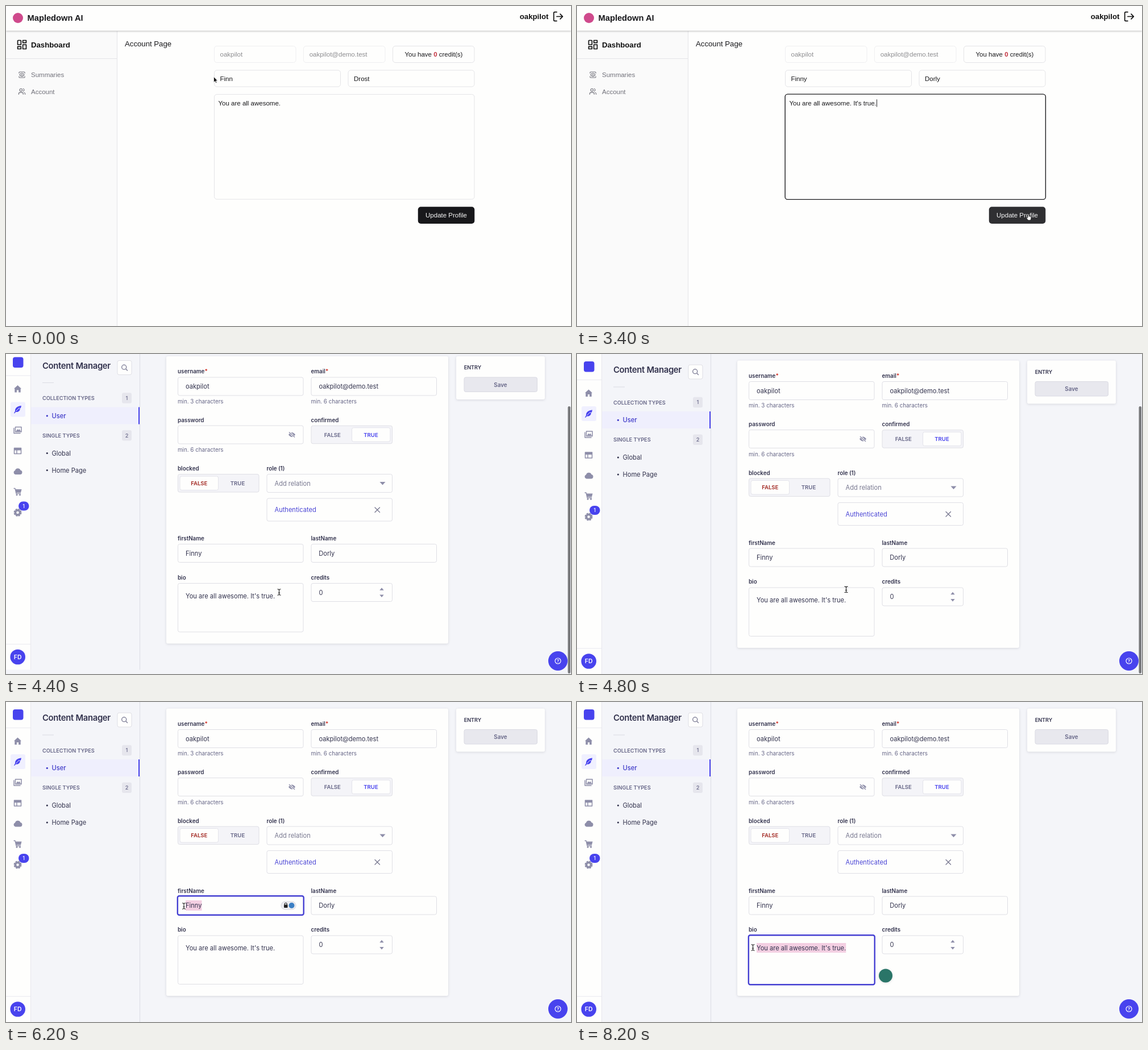
Write an HTML page that moves like this. It is 994 px wide and 563 px high and loops after 8400 ms.

```html
<!DOCTYPE html>
<html lang="en">
<head>
<meta charset="utf-8">
<title>Profile update</title>
<style>
html, body { margin: 0; width: 100%; height: 100%; overflow: hidden; background: #fefefd; }
svg { display: block; width: 994px; height: 563px; }
text { white-space: pre; }
.user { font-family: "Liberation Sans", Arial, sans-serif; }
.admin { font-family: Inter, "Open Sans", sans-serif; }
.card { filter: drop-shadow(0 1px 2px #21213425); }
.line { fill: none; stroke-linecap: round; stroke-linejoin: round; }
</style>
</head>
<body>
<svg id="stage" viewBox="0 0 994 563"></svg>
<script>
const LOOP = 8400, STEP = 200;
const BLUE = '#4843ee', INK = '#32324d', GREY = '#666687', ICON = '#8e8ea9', EDGE = '#dfdfe5', PAPER = '#fefefd';
const NAME = 'oakpilot', MAIL = 'oakpilot@demo.test';

// Markup helpers
const text = (x, y, s, size, fill, weight = 400, more = '') =>
  `<text x="${x}" y="${y}" font-size="${size}" fill="${fill}" font-weight="${weight}" ${more}>${s}</text>`;
const mid = (x, y, s, size, fill, weight) => text(x, y, s, size, fill, weight, 'text-anchor="middle"');
const box = (x, y, w, h, fill, stroke = 'none', r = 0, more = '') =>
  `<rect x="${x}" y="${y}" width="${w}" height="${h}" rx="${r}" fill="${fill}" stroke="${stroke}" ${more}/>`;
const dot = (x, y, r, fill, more = '') => `<circle cx="${x}" cy="${y}" r="${r}" fill="${fill}" ${more}/>`;
const path = (d, more = '') => `<path d="${d}" ${more}/>`;
const at = (x, y, body, more = '', scale = 1) =>
  `<g transform="translate(${x} ${y}) scale(${scale})" ${more}>${body}</g>`;
// Outline icon on a 24 unit grid, centred at x, y
const outline = (x, y, scale, colour, body) =>
  at(x, y, `<g transform="translate(-12 -12)">${body}</g>`, `class="line" stroke="${colour}" stroke-width="2"`, scale);

// Editable fields: box, text position, text size, height of the marking above and below the baseline
const fields = {
  first: { r: [366.5, 113, 222, 29], x: 376.5, y: 131.7, up: 10.7, down: 2.5 },
  last: { r: [602, 113, 222, 29], x: 612, y: 131.7, up: 10.7, down: 2.5 },
  area: { r: [366.5, 155.5, 457.5, 184.5], x: 373.5, y: 175, up: 10.7, down: 2.5 },
  adminFirst: { r: [302.5, 342, 220.5, 32], x: 316, y: 362.2, up: 13.2, down: 4.8 },
  adminLast: { r: [537, 342, 220.5, 32], x: 550.3, y: 362.2, up: 13.2, down: 4.8 },
  adminArea: { r: [302.5, 411, 220.5, 85.5], x: 316, y: 437, up: 13, down: 4 }
};
const isAdmin = id => id.startsWith('admin');
function fieldMarkup(id) {
  const f = fields[id], a = isAdmin(id);
  return box(...f.r, PAPER, a ? EDGE : '#e4e4e7', a ? 3 : 4.5, `id="${id}Box"`) +
    box(f.x, f.y - f.up, 0, f.up + f.down, '#f3cfe2', 'none', 0, `id="${id}Mark"`) +
    text(f.x, f.y, '', a ? 11.1 : 11.5, a ? INK : '#18181b', 400, `id="${id}Text"`) +
    box(f.x, f.y - f.up, 0.9, f.up + f.down, '#18181b', 'none', 0, `id="${id}Caret"`);
}

function userScene() {
  const mute = '#71717a', pale = '#efeff1';
  return box(0, 0, 994, 563, PAPER) +
    box(0, 44, 195, 519, '#fafafa') + box(195, 44, 1, 519, '#e4e4e8') + box(0, 92, 195, 1, '#e4e4e8') +
    box(0, 0, 994, 43.5, PAPER, 'none', 0, 'style="filter:drop-shadow(0 1px 1.5px #0004)"') +
    dot(21, 21, 9, '#cf4a8c') +
    text(37.5, 26, 'Mapledown AI', 14.7, '#18181b', 700) +
    text(903.8, 23.2, NAME, 13.2, '#111', 700) +
    outline(971.5, 18.5, 0.87, '#111', path('M9 21H5a2 2 0 0 1-2-2V5a2 2 0 0 1 2-2h4M16 17l5-5-5-5M21 12H9')) +
    outline(28, 68, 0.83, '#111', path('M4 3h5a1 1 0 0 1 1 1v8H3V4a1 1 0 0 1 1-1zM14 3h7v5h-7zM14 12h7v9h-7zM3 16h7v5H3z')) +
    text(44, 72.8, 'Dashboard', 13.2, '#111', 700) +
    outline(28, 121, 0.56, mute, path('M5 12s2.5-5 7-5 7 5 7 5-2.5 5-7 5-7-5-7-5zM21 17v2a2 2 0 0 1-2 2H5a2 2 0 0 1-2-2v-2M21 7V5a2 2 0 0 0-2-2H5a2 2 0 0 0-2 2v2') + dot(12, 12, 1, mute)) +
    text(44, 125, 'Summaries', 11.5, mute) +
    outline(28, 150.5, 0.56, mute, path('M16 21v-2a4 4 0 0 0-4-4H6a4 4 0 0 0-4 4v2M22 21v-2a4 4 0 0 0-3-3.9M16 3.1a4 4 0 0 1 0 7.8') + dot(9, 7, 4, 'none')) +
    text(44, 154.8, 'Account', 11.5, mute) +
    text(209, 71.3, 'Account Page', 13.2, '#18181b') +
    box(366.5, 70.5, 143.5, 29, PAPER, pale, 4.5) + text(376.5, 89, NAME, 11.5, '#8d8d90') +
    box(523.5, 70.5, 143.5, 29, PAPER, pale, 4.5) + text(533.7, 89, MAIL, 11.5, '#8d8d90') +
    box(680.5, 70.5, 143.5, 29, PAPER, '#e4e4e7', 4.5) +
    mid(752.4, 89, 'You have <tspan fill="#c3313f" font-weight="700">0</tspan> credit(s)', 11.5, '#18181b') +
    ['first', 'last', 'area'].map(fieldMarkup).join('') +
    box(724.8, 353.3, 99.5, 29.7, '#18181b', 'none', 5, 'id="update"') +
    mid(774.5, 372.3, 'Update Profile', 11.5, '#fafafa');
}

function adminNav() {
  const icons =
    at(20.5, 69, path('M0-6.5L6.5-.5H5.2V6H1.6V2H-1.6V6H-5.2V-.5H-6.5z')) +
    at(20.5, 105, path('M6.5-6.5C1-6.5-5-3-4.5 3L-6.5 6.5l1 .5L-3.5 4.5C3 5 4 1 4.5-1H2L5.5-2.5z', `fill="${BLUE}"`) +
      path('M-3 3L3-3', 'stroke="#f0f0ff"')) +
    at(20.5, 141.5, path('M-4-5.5H6.5V3H-4zM-6.5-3.5V5.5H4.5', `class="line" stroke="${ICON}" stroke-width="1.5"`) + path('M-3 2L0-2 1.5 0 3-2 5.5 2z')) +
    at(20.5, 178, path('M-6-5H6V5H-6zM-6-1.8H6M-1.5-2V5', `class="line" stroke="${ICON}" stroke-width="1.5"`) + box(-6, -5, 12, 3)) +
    at(20.5, 214, path('M-4 5.5A3.7 3.7 0 0 1-4.5-1.6 5 5 0 0 1 5-2 3.8 3.8 0 0 1 4 5.5z')) +
    at(20.5, 250, path('M-6.5-6H-4.5L-2.5 3H5', `class="line" stroke="${ICON}" stroke-width="1.4"`) +
      path('M-4-4.5H7L5.5 1.5H-2.8z') + dot(-1.5, 5.3, 1.5, ICON) + dot(4, 5.3, 1.5, ICON)) +
    at(20.5, 286.5, dot(0, 0, 4, 'none', `stroke="${ICON}" stroke-width="3.5"`) +
      dot(0, 0, 6, 'none', `stroke="${ICON}" stroke-width="2" stroke-dasharray="3.2 1.51"`));
  const badge = (y, n) => box(204, y, 17, 18.5, '#e6e6ed', 'none', 3) + mid(212.5, y + 12.7, n, 9.2, GREY, 500);
  const item = (y, s, fill, weight) => dot(72.3, y - 4, 1.6, fill) + text(80.5, y, s, 11.1, fill, weight);
  return box(0, -20, 43.5, 583, PAPER) + box(43, -20, 1, 583, '#e8e8ee') + box(235, -20, 1, 583, '#dcdce4') +
    box(12, 13, 18.5, 18.5, BLUE, 'none', 4) + box(0, 45, 43, 1, '#eaeaef') +
    box(8, 92, 26, 26, '#f0f0ff', 'none', 3) + `<g fill="${ICON}">${icons}</g>` +
    box(22, 267, 18.5, 16, BLUE, 'none', 8) + mid(31.2, 278.3, '1', 9, '#fff', 500) +
    box(0, 517.5, 43, 1, '#eaeaef') + dot(20.7, 540.5, 13.3, BLUE) + mid(20.7, 544.3, 'FD', 10.5, '#fff', 600) +
    text(64, 33, 'Content Manager', 14.8, INK, 600, 'letter-spacing="-.3"') +
    box(196, 19, 25, 25, PAPER, EDGE, 3) +
    at(208.5, 31.5, path('M2.8 2.8L5 5') + dot(-.8, -.8, 4, 'none'), 'class="line" stroke="#777791" stroke-width="1.3"') +
    box(64, 57.5, 20, 1, '#dcdce4') +
    text(64, 88.6, 'COLLECTION TYPES', 9.2, GREY, 600) + badge(75.7, '1') +
    box(44, 101, 191, 30, '#efeffd') + box(233, 101, 2, 30, BLUE) + item(120.3, 'User', '#3c37c8', 500) +
    text(64, 154.2, 'SINGLE TYPES', 9.2, GREY, 600) + badge(141.5, '2') +
    item(186, 'Global', INK) + item(216, 'Home Page', INK);
}

function adminForm() {
  const label = (x, y, s, star) => text(x, y, s + (star ? '<tspan fill="#d02b20">*</tspan>' : ''), 9.8, INK, 600);
  const hint = (x, y, n) => text(x, y, `min. ${n} characters`, 9.8, GREY);
  const input = (x, y, w, h, s = '', fill = INK) => box(x, y, w, h, PAPER, EDGE, 3) + text(x + 13.5, y + 20.2, s, 11.1, fill);
  const toggle = (x, y, on, colour) => box(x, y, 142.5, 31.5, '#f4f4f8', EDGE, 3) +
    box(x + (on ? 71.5 : 3.5), y + 3.5, 67.5, 24.5, PAPER, '#e3e3ea', 3) +
    mid(x + 37.3, y + 19.3, 'FALSE', 9.6, on ? GREY : colour, 600) +
    mid(x + 105, y + 19.3, 'TRUE', 9.6, on ? colour : GREY, 600);
  return box(282, 11.5, 496, 505.5, PAPER, 'none', 3, 'class="card"') +
    box(792, 11.5, 156, 76, PAPER, 'none', 3, 'class="card"') +
    text(805.7, 34.7, 'ENTRY', 9.1, INK, 600) +
    box(806, 48.5, 128.5, 25.5, '#e8e8ee', '#d9d9e2', 3) + mid(870, 65, 'Save', 9.9, GREY, 600) +
    label(302, 41.5, 'username', 1) + input(302.5, 48.5, 220.5, 32, NAME) + hint(302, 94, 3) +
    label(536.5, 41.5, 'email', 1) + input(537, 48.5, 220.5, 32, MAIL) + hint(536.5, 94, 6) +
    label(302, 127, 'password') + input(302.5, 133.5, 220.5, 32) + hint(302, 179.5, 6) +
    at(503, 149.5, path('M-6 0Q0-8 6 0Q0 8-6 0z', `fill="${ICON}"`) + dot(0, 0, 2, PAPER) +
      path('M-5-5L5 5', `stroke="${PAPER}" stroke-width="3"`) + path('M-5-4.5L5 4.5', `stroke="${ICON}" stroke-width="1.4"`)) +
    label(536.5, 127, 'confirmed') + toggle(537, 133.7, true, BLUE) +
    label(302, 212.5, 'blocked') + toggle(302.5, 219, false, '#a32a24') +
    label(458.5, 212.5, 'role (1)') + input(459, 219, 220.5, 32, 'Add relation', '#77778f') +
    path('M657.5 232.5h10l-5 5.5z', `fill="${ICON}"`) +
    box(459, 261.5, 220.5, 40, PAPER, EDGE, 3) + text(472.5, 285.5, 'Authenticated', 11.1, '#4a45d5') +
    path('M649 277.5l8.5 8.5m0-8.5l-8.5 8.5', 'class="line" stroke="#77778f" stroke-width="1.3"') +
    label(302, 335.5, 'firstName') + label(536.5, 335.5, 'lastName') +
    label(302, 404, 'bio') + label(536.5, 404, 'credits') +
    ['adminFirst', 'adminLast', 'adminArea'].map(fieldMarkup).join('') +
    input(537, 411, 142.5, 32, '0') + path('M657.3 423.3h7.4l-3.7-4.6zM657.3 431h7.4l-3.7 4.6z', `fill="${ICON}"`) +
    `<g id="keeper">${box(-13, -7, 26, 14, '#eeeef2', '#d5d5dd', 7)}${box(-8, -1.5, 6.5, 5.5, '#222', 'none', 1)}` +
    path('M-6.8-1v-1.5a2 2 0 0 1 4 0V-1', 'class="line" stroke="#222" stroke-width="1.2"') + dot(5.5, 0, 5, '#3b7fc4') + '</g>' +
    dot(543, 481.5, 12, '#2a7568', 'id="helper" class="card"');
}

const pointers = {
  arrow: path('M0 0V9.8L2.3 7.8 3.8 11 5.3 10.3 3.9 7.2H6.8z', 'fill="#111" stroke="#fff" stroke-width=".7"'),
  beam: path('M-2.6-5.2Q0-5.2 0-3.6Q0-5.2 2.6-5.2M0-4V4M-2.6 5.2Q0 5.2 0 3.6Q0 5.2 2.6 5.2M-1.2 1.2H1.2', 'class="line" stroke="#222" stroke-width="1.1"'),
  hand: path('M-2 1V-4.5Q-1-6 0-4.5V-1Q3-1.5 4 .2V3L3 6H-1.5L-4.3 2Q-4.3.3-2 1.5z', 'fill="#fff" stroke="#111" stroke-width=".8"')
};

const $ = id => document.getElementById(id);
$('stage').innerHTML =
  `<g id="user" class="user">${userScene()}</g>` +
  `<g id="admin" class="admin">${box(0, 0, 994, 563, '#f4f5f9')}<g id="form">${adminForm()}</g><g id="nav">${adminNav()}</g>` +
  dot(971, 540, 17, BLUE) + dot(971, 540, 5, 'none', 'stroke="#fff" stroke-width="1.2"') + mid(971, 542.8, '?', 7.5, '#fff', 700) +
  box(988.5, 92, 4.5, 470, '#77787b', 'none', 2.2, 'id="thumb"') + '</g>' +
  `<g id="pointer">${Object.entries(pointers).map(([k, d]) => `<g id="${k}">${d}</g>`).join('')}</g>`;

// time, x, y, pointer kind (empty while typing)
const moves = [
  [0, 365.5, 124.5, 'arrow'], [200, 396, 129, 'beam'], [400, 404, 129, 'beam'], [600, 404, 129, ''],
  [1000, 642, 129, 'beam'], [1200, 627, 129, 'beam'], [1400, 601.5, 127, 'arrow'], [1800, 601.5, 127, ''],
  [2400, 560, 178, 'beam'], [2600, 560, 178, ''], [3200, 720, 320, 'beam'], [3400, 795, 371, 'hand'],
  [3800, 620, 300, 'arrow'], [4400, 480.5, 419, 'beam'], [5000, 470, 412, 'beam'], [5400, 395, 357, 'beam'],
  [5600, 347, 359, 'beam'], [5800, 332, 359, 'beam'], [6000, 313, 359, 'beam'], [6400, 313, 359, 'beam'],
  [6600, 581, 361, 'beam'], [6800, 563, 363, 'beam'], [7000, 548.5, 366, 'beam'], [7200, 548.5, 366, 'beam'],
  [7600, 477, 434, 'beam'], [8200, 309.5, 432, 'beam']
];
// time, focused field, marked share of its text
const focuses = [
  [0, '', 0], [400, 'first', 0], [1200, 'last', .45], [1400, 'last', 1], [1800, 'last', 0], [2400, 'area', 0], [3600, '', 0],
  [5800, 'adminFirst', .45], [6000, 'adminFirst', 1], [6800, 'adminLast', .55], [7000, 'adminLast', 1],
  [7600, 'adminArea', 0], [7800, 'adminArea', .33], [8000, 'adminArea', .68], [8200, 'adminArea', 1]
];
const scrolls = [[0, 111], [3800, 111], [4000, 75], [4200, 22], [4400, -7.5], [4600, -2.5], [4800, 0]];

const latest = (keys, t) => keys.findLastIndex(k => k[0] <= t);
function tween(keys, t, col) {
  const i = latest(keys, t), a = keys[i], b = keys[i + 1] || a;
  return a[col] + (b[col] - a[col]) * (b === a ? 0 : (t - a[0]) / (b[0] - a[0]));
}
const show = (id, on) => $(id).setAttribute('display', on ? 'inline' : 'none');
const set = (id, attrs) => Object.entries(attrs).forEach(([k, v]) => $(id).setAttribute(k, v));
const typed = (s, t, start, perStep) => s.slice(0, Math.max(0, Math.floor((t - start) / STEP * perStep)));

function draw(t) {
  const inAdmin = t >= 3800;
  show('user', !inAdmin);
  show('admin', inAdmin);

  const [, focus, share] = focuses[latest(focuses, t)];
  const first = t < 600 ? 'Finn' : 'Finny';
  const last = t < 1800 ? 'Drost' : typed('Dorly', t, 1600, 2);
  const bio = 'You are all awesome.' + typed(" It's true.", t, 2400, 3);
  const values = { first, last, area: bio, adminFirst: first, adminLast: last, adminArea: bio };

  for (const id in fields) {
    if (isAdmin(id) !== inAdmin) continue;
    const f = fields[id], on = id === focus, grow = on ? (inAdmin ? .7 : .4) : 0;
    const [x, y, w, h] = f.r;
    const idle = inAdmin ? EDGE : '#e4e4e7', lit = inAdmin ? '#4540d2' : '#1b1b1e';
    set(id + 'Box', {
      x: x - grow, y: y - grow, width: w + 2 * grow, height: h + 2 * grow,
      stroke: on ? lit : idle, 'stroke-width': on ? (inAdmin ? 2.4 : 1.4) : 1
    });
    $(id + 'Text').textContent = values[id];
    const len = $(id + 'Text').getComputedTextLength(), mark = on ? len * share : 0;
    set(id + 'Mark', { x: f.x + len - mark, width: mark });
    set(id + 'Caret', { x: f.x + len + .3 });
    show(id + 'Caret', on && !share);
  }

  $('update').setAttribute('fill', t >= 3400 ? '#2f2f32' : '#18181b');
  const dy = tween(scrolls, t, 1);
  set('form', { transform: `translate(0 ${dy})` });
  set('nav', { transform: `translate(0 ${Math.min(dy, 0)})` });
  set('thumb', { y: 92 - Math.max(dy, 0) * .83 });
  show('thumb', t >= 4000 && t < 5200);
  show('keeper', focus === 'adminFirst' || focus === 'adminLast');
  set('keeper', { transform: `translate(${focus === 'adminFirst' ? 497 : 731.5} 358)` });
  show('helper', focus === 'adminArea');

  const kind = moves[latest(moves, t)][3];
  for (const k in pointers) show(k, k === kind);
  set('pointer', { transform: `translate(${tween(moves, t, 1)} ${tween(moves, t, 2)})` });
}

const start = performance.now();
function tick() {
  const t = (performance.now() - start) % LOOP;
  draw(Math.floor(t / STEP) * STEP);
  requestAnimationFrame(tick);
}
tick();
</script>
</body>
</html>
```
